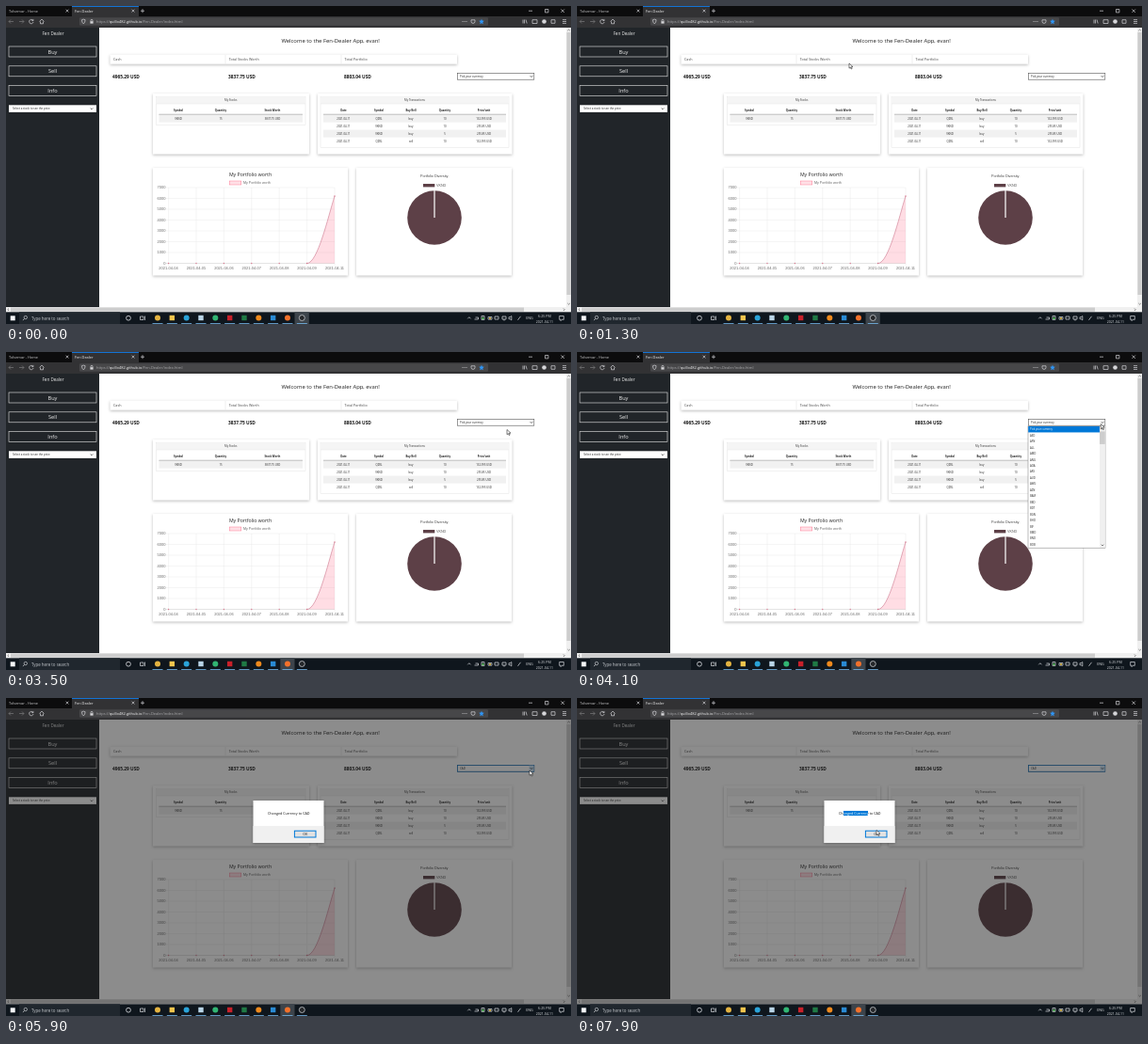
Write an HTML page that moves like this. It is 600 by 338 pixels and loops after 8000 ms.

```html
<!DOCTYPE html>
<html lang="en">
<head>
<meta charset="utf-8">
<title>Fen Dealer</title>
<style>
  html, body { margin: 0; height: 100%; overflow: hidden; background: #fff; }
  svg { display: block; font-family: "Open Sans", "Noto Sans", sans-serif; }
  #stage { width: 100vw; height: 100vh; }
  .card { fill: #fff; filter: drop-shadow(0 1px 1.6px #0004); }
  .chart { font-family: "Liberation Sans", Arial, sans-serif; }
  .line { fill: none; stroke-width: .7; }
</style>
</head>
<body>
<svg id="stage" viewBox="0 0 600 338"></svg>
<script>
const stage = document.getElementById('stage');
const BLUE = '#0078d7';

const rect = (x, y, w, h, fill, extra = '') =>
  `<rect x="${x}" y="${y}" width="${w}" height="${h}" fill="${fill}" ${extra}/>`;
const box = (x, y, w, h, stroke, fill = 'none', sw = .6) =>
  rect(x, y, w, h, fill, `stroke="${stroke}" stroke-width="${sw}"`);
const card = (x, y, w, h) => rect(x, y, w, h, '#fff', 'class="card"');
const text = (x, y, str, size, fill = '#222', extra = '') =>
  `<text x="${x}" y="${y}" font-size="${size}" fill="${fill}" ${extra}>${str}</text>`;
const mid = (x, y, str, size, fill, extra = '') =>
  text(x, y, str, size, fill, 'text-anchor="middle" ' + extra);
const line = (d, stroke, extra = '') => `<path class="line" d="${d}" stroke="${stroke}" ${extra}/>`;
const dot = (x, y, r, fill, extra = '') => `<circle cx="${x}" cy="${y}" r="${r}" fill="${fill}" ${extra}/>`;
const chevron = (x, y, color = '#222') => line(`M${x - 1.3} ${y - .7}l1.3 1.3 1.3-1.3`, color);
const group = (id, body) => `<g id="${id}">${body}</g>`;
const BOLD = 'font-weight="700"';

function browserBar() {
  const c = '#d5d5d8';
  return rect(0, 0, 600, 11, '#0c0c0d') + rect(0, 11, 600, 12, '#323234')
    + rect(70, 0, 71, 11, '#323234') + rect(70, 0, 71, .8, '#0a84ff')
    + text(3, 7, 'Tolvemar - Home', 3.9, '#c8c8ca') + text(73, 7, 'Fen Dealer', 3.9, '#f4f4f4')
    + [65, 135].map(x => line(`M${x - 1.4} 3.7l2.8 2.8m0-2.8l-2.8 2.8`, c)).join('')
    + line('M143 5.2h4m-2-2v4M555 5.2h4M572.5 3.5h3.4v3.4h-3.4zM589.5 3.5l3.4 3.4m0-3.4l-3.4 3.4', c)
    + rect(78, 12.3, 434, 8.4, '#474749', 'rx="1"')
    + line('M8 16.5h-5m2-2l-2 2 2 2', '#7a7a7c') + line('M14 16.5h5m-2-2l2 2-2 2', '#7a7a7c')
    + line('M28.8 15.5a2.2 2.2 0 1 0 .2 1.6m-.1-3.2v1.7h-1.7M35.5 16.5l2.5-2.4 2.5 2.4m-4 0v2.3h3v-2.3', c)
    + line('M80.5 14.7l1.8-.6 1.8.6q0 3-1.8 4.2-1.8-1.2-1.8-4.2zM90 16.3v-1a1 1 0 0 1 2 0v1', c)
    + rect(89.4, 16.2, 3.2, 2.4, c)
    + text(96, 18, 'https://<tspan fill="#f4f4f4">quillo482.github.io</tspan>/Fen-Dealer/index.html', 4, '#a9a9ab')
    + [485, 487, 489].map(x => dot(x, 16.5, .5, c)).join('')
    + line('M494 14.8h4v1.6a2 2 0 0 1-4 0z', c)
    + `<path d="M505 13.8l.8 1.8 2 .2-1.5 1.4.5 2-1.8-1-1.8 1 .5-2-1.5-1.4 2-.2z" fill="#2f95f5"/>`
    + line('M549 14.5v4m1.5-4v4m1.5-4l1.2 4M559 14.7h5v3.8h-5z', c)
    + dot(571.5, 16.5, 2.3, c) + line('M579 14.7h4v3.6h-4zM591 14.6h4m-4 1.9h4m-4 1.9h4', c);
}

function sidebar() {
  return rect(0, 23, 99, 297, '#212529') + mid(50, 31, 'Fen Dealer', 4.6, '#e8e8e8')
    + ['Buy', 'Sell', 'Info'].map((label, i) =>
        box(3, 43 + i * 20.8, 93, 11, '#e8e8e8') + mid(49.5, 50.6 + i * 20.8, label, 5.6, '#f2f2f2')).join('')
    + rect(3, 105.3, 93, 7.6, '#fff') + text(7, 110.2, 'Select a stock to see the price', 2.9)
    + chevron(91, 109.2);
}

function table(x, w, title, columns, head, rows) {
  const cells = (values, y, extra) =>
    values.map((v, i) => mid(columns[i], y, v, 2.75, '#222', extra)).join('');
  const bottom = 115.6 + rows.length * 8 + 3;
  return box(x, 96.7, w, bottom - 96.7, '#ddd', 'none', .4) + rect(x, 96.7, w, 7.3, '#f5f5f5')
    + line(`M${x} 104h${w}`, '#ddd', 'style="stroke-width:.4"')
    + mid(x + w / 2, 101.4, title, 2.9, '#333') + cells(head, 112, BOLD)
    + line(`M${x + 3} 115.3h${w - 6}`, '#444', 'style="stroke-width:.5"')
    + rows.map((row, i) => (i % 2 ? '' : rect(x + 3, 115.6 + i * 8, w - 6, 8, '#f1f1f1'))
        + cells(row, 120.6 + i * 8)).join('');
}

function lineChart() {
  const X = i => 172.6 + i * 29.4, Y = i => 273.5 - i * 11.5;
  let out = '';
  for (let i = 0; i < 8; i++)
    out += line(`M170 ${Y(i)}H349`, i ? '#e6e6e6' : '#bbb', 'style="stroke-width:.4"')
      + text(169.5, Y(i) + 1.4, i * 1000 || 0, 4, '#666', 'text-anchor="end"');
  ['04', '05', '06', '07', '08', '09', '11'].forEach((day, i) => {
    out += line(`M${X(i)} 193V276`, '#e6e6e6', 'style="stroke-width:.4"')
      + mid(X(i), 280.3, '2021-04-' + day, 4, '#666') + dot(X(i), i < 6 ? 273.5 : 202, .7, '#d9788f');
  });
  const curve = 'M319.6 273.5C331 273.5 342 224 349 202';
  return card(156, 172, 207, 114.5) + mid(259.5, 181, 'My Portfolio worth', 5.2)
    + '<g class="chart">' + box(237.3, 186, 12.5, 4, '#ff6384', '#ffe0e6', .4)
    + text(252, 189.3, 'My Portfolio worth', 3.6, '#666') + out
    + `<path d="${curve}V273.5z" fill="#ff6384" fill-opacity=".22"/>`
    + line(curve, '#c0607a', 'style="stroke-width:.5"') + '</g>';
}

function pieChart() {
  return card(372, 172, 165, 114.5) + '<g class="chart">'
    + mid(454.7, 181.6, 'Portfolio Diversity', 3.8, '#444')
    + rect(443, 189, 12.3, 3.4, '#5d4047') + text(457, 192.2, 'VKND', 3.7, '#555')
    + dot(455, 225, 28.8, '#5d4047') + line('M455 225V196', '#fff', 'style="stroke-width:1.2"') + '</g>';
}

function page() {
  const buy = (name, type, n, price) => ['2021-04-11', name, type, n, price + ' USD'];
  return rect(99, 23, 501, 297, '#fff')
    + mid(344.7, 39, 'Welcome to the Fen-Dealer App, evan!', 5.9)
    + card(110.5, 51.7, 368.5, 10)
    + [['Cash', '4965.29'], ['Total Stocks Worth', '3837.75'], ['Total Portfolio', '8803.04']].map(([label, sum], i) =>
        (i ? line(`M${110 + i * 123} 52v9.6`, '#ddd', 'style="stroke-width:.5"') : '')
        + text(114 + i * 122.8, 58.2, label, 3.7, '#444')
        + text(113 + i * 123, 76.6, sum + ' USD', 4.8, '#111', BOLD)).join('')
    + card(156, 93, 166, 64.5)
    + table(159.5, 158.5, 'My Stocks', [183, 228, 283], ['Symbol', 'Quantity', 'Stock Worth'],
        [['VKND', 15, '3837.75 USD']])
    + card(331, 93, 206.5, 64.5)
    + table(334, 200, 'My Transactions', [358.5, 396, 430, 466, 507.5],
        ['Date', 'Symbol', 'Buy/Sell', 'Quantity', 'Price/unit'],
        [buy('QZRL', 'buy', 10, 132.995), buy('VKND', 'buy', 10, 255.85),
         buy('VKND', 'buy', 5, 255.85), buy('QZRL', 'sell', 10, 132.995)])
    + lineChart() + pieChart()
    + rect(595, 23, 5, 297, '#f0f0f0') + rect(595.4, 28, 4.2, 279, '#cdcdcd')
    + rect(0, 320, 600, 5.3, '#f0f0f0') + rect(5, 320.5, 545, 4.3, '#cdcdcd')
    + line('M596.4 26.2l1.2-1.2 1.2 1.2M596.4 316l1.2 1.2 1.2-1.2M3 321.5l-1.2 1.2 1.2 1.2M592 321.5l1.2 1.2-1.2 1.2', '#555');
}

const CURRENCIES = ('Pick your currency,AED,AFN,ALL,AMD,ANG,AOA,ARS,AUD,AWG,AZN,BAM,BBD,BDT,BGN,BHD,BIF,BMD,'
  + 'BND,BOB,BRL,BSD,BTC,BTN,BWP,BYN,BZD,CAD').split(',');

const menu = (id, top, picked) => group(id,
  rect(479, 78.8, 82, 129.4, '#fff', 'stroke="#777" stroke-width=".5"')
  + CURRENCIES.slice(top, top + 20).map((name, i) => {
      const on = i + top === picked, y = 79 + i * 6.45;
      return (on ? rect(479.2, y, 76, 6.45, BLUE) : '') + text(481, y + 4.3, name, 2.8, on ? '#fff' : '#222');
    }).join('')
  + rect(555, 79, 5.8, 129, '#f0f0f0') + rect(555, 84.4 + top * .7, 5.8, 13.5, '#cdcdcd')
  + line('M556.8 82.4l1.2-1.2 1.2 1.2', '#555') + chevron(558, 205.4, '#555'));

// Blue bar plus the same text in white, both limited to the selected part
const selection = (id, x, y, h, label) =>
  `<clipPath id="${id}Clip"><rect id="${id}" x="${x}" y="${y}" width="0" height="${h}"/></clipPath>`
  + `<g clip-path="url(#${id}Clip)">${rect(x, y, 60, h, BLUE)}${label}</g>`;

function dialog() {
  const message = fill => text(278, 124, 'Changed Currency to CAD', 3.7, fill);
  return rect(0, 23, 600, 302.3, '#1a1a1a', 'opacity=".5"')
    + rect(262.5, 109, 75, 45, '#fff', 'class="card"') + rect(262.5, 136, 75, 18, '#f0f0f0')
    + message('#111') + selection('pickedMessage', 283, 119.8, 5.4, message('#fff'))
    + box(306.4, 141.2, 22.6, 6.8, BLUE, '#e1e1e1', 1) + mid(317.7, 146, 'OK', 3.7);
}

function taskbar() {
  const c = '#dcdfe2';
  const apps = ['#e3b341', '#f3c54d', '#2aa3d8', '#b9d4e6', '#31b573', '#c8202a', '#1f7a45', '#f08a1d', '#2a8ad4', '#f4712b'];
  return rect(0, 325.3, 600, 13, '#0f161d') + rect(14, 325.3, 107, 13, '#20272e')
    + rect(4.7, 329.3, 5, 5, '#f4f6f8')
    + dot(20.8, 331, 1.7, 'none', `stroke="${c}" stroke-width=".6"`) + line('M19.6 332.3l-1.7 1.8', c)
    + text(27, 333.6, 'Type here to search', 4.4, '#c3c7cb')
    + dot(130, 331.7, 2.4, 'none', `stroke="${c}" stroke-width=".8"`)
    + line('M142.5 330h3.5v3.5h-3.5zM147.5 329.5v4.5', c)
    + group('recorderActive', rect(306.5, 325.3, 15.3, 13, '#3d444b'))
    + group('browserActive', rect(291.3, 325.3, 15.2, 13, '#3d444b'))
    + apps.map((color, i) => {
        const x = 161 + i * 15.33;
        return ([1, 3, 5, 6, 8].includes(i) ? rect(x - 2.7, 328.8, 5.4, 5.4, color) : dot(x, 331.5, 3, color))
          + rect(x - 5.5, 337.2, 11, .8, '#76b9ed');
      }).join('')
    + dot(314.3, 331.5, 3, '#26282b', `stroke="${c}" stroke-width=".7"`) + rect(308.8, 337.2, 11, .8, '#76b9ed')
    + line('M490.3 332.3l1.6-1.6 1.6 1.6M497.5 333h4v-2h-3M505 329.5h3v4h-3zM512 330.5h4v2.6h-4zM519 330h4v3h-4z'
        + 'M527 330h4v3h-4zm2 3v1.5M534 330.7h1.3l1.5-1.2v4.4l-1.5-1.2H534zM543.5 333.8l3-4', c)
    + dot(506.5, 332, 1.2, '#4db051') + dot(514, 332, 1, '#f0c74a')
    + mid(556, 333.2, 'ENG', 3.7, c) + mid(572, 330.6, '6:25 PM', 3.7, c) + mid(572, 336.5, '2021-04-11', 3.5, c)
    + line('M587.7 329.5h4.6v3.8h-2l-1.2 1.3v-1.3h-1.4z', c);
}

stage.innerHTML = browserBar() + page() + sidebar()
  + selection('pickedCash', 118.4, 71.4, 7.2, text(113, 76.6, '4965.29 USD', 4.8, '#fff', BOLD))
  + box(479.3, 71.4, 81.5, 6.8, '#555', '#fff')
  + group('noCurrency', text(482, 75.9, CURRENCIES[0], 2.9))
  + group('hasCurrency', box(479.3, 71.4, 81.5, 6.8, BLUE) + rect(555.5, 71.7, 5, 6.2, '#cce4f7') + text(482, 75.9, 'CAD', 2.9))
  + chevron(558, 74.9)
  + menu('menuTop', 0, 0) + menu('menuScrolled', 8, 27)
  + group('alert', dialog()) + taskbar()
  + group('arrow', '<path d="M0 0V5.2L1.3 4.1 2.2 6 3.1 5.6 2.3 3.7H4z" fill="#fff" stroke="#000" stroke-width=".5"/>')
  + group('beam', line('M-1.2-3H1.2M0-3V3M-1.2 3H1.2', '#333', 'style="stroke-width:.5"'));

const $ = id => document.getElementById(id);
const show = (id, on) => $(id).style.display = on ? '' : 'none';

// Pointer stops: time, x, y
const PATH = [[0, 314, 345], [100, 314, 336], [900, 293, 58], [1300, 289, 61], [1900, 118.4, 75], [2500, 139, 75],
  [2600, 139, 75], [2900, 157, 76], [3000, 157, 76], [3500, 532, 82.5], [3900, 557, 75], [4200, 556, 77],
  [5900, 556, 77], [6700, 352, 122.5], [7100, 283, 122.5], [7600, 303, 122.5], [7700, 309, 122.5],
  [7900, 318, 140.5], [8000, 318, 140.5]];

function pointer(t) {
  const i = PATH.findIndex(stop => stop[0] > t);
  const [t0, x0, y0] = PATH[i - 1], [t1, x1, y1] = PATH[i];
  const k = (t - t0) / (t1 - t0), e = k * k * (3 - 2 * k);
  return [x0 + (x1 - x0) * e, y0 + (y1 - y0) * e];
}

function draw(now) {
  const t = Math.floor(now % 8000 / 100) * 100;
  const between = (a, b) => t >= a && t < b;
  const [x, y] = pointer(t);
  const onText = between(1900, 3100) || between(6700, 7800);

  for (const id of ['arrow', 'beam']) $(id).setAttribute('transform', `translate(${x} ${y})`);
  show('arrow', !onText);
  show('beam', onText);
  show('recorderActive', t < 1800);
  show('browserActive', t >= 1800);

  const cash = between(1900, 3100) ? Math.min(x, 142) - 118.4 : 0;
  const message = t >= 7700 ? 26 : t >= 7100 ? x - 283 : 0;
  $('pickedCash').setAttribute('width', Math.max(0, cash));
  $('pickedMessage').setAttribute('width', Math.max(0, message));

  show('noCurrency', t < 5000);
  show('hasCurrency', t >= 5000);
  show('menuTop', between(4100, 5000));
  show('menuScrolled', between(5000, 5900));
  show('alert', t >= 5900);
  requestAnimationFrame(draw);
}
requestAnimationFrame(draw);
</script>
</body>
</html>
```
